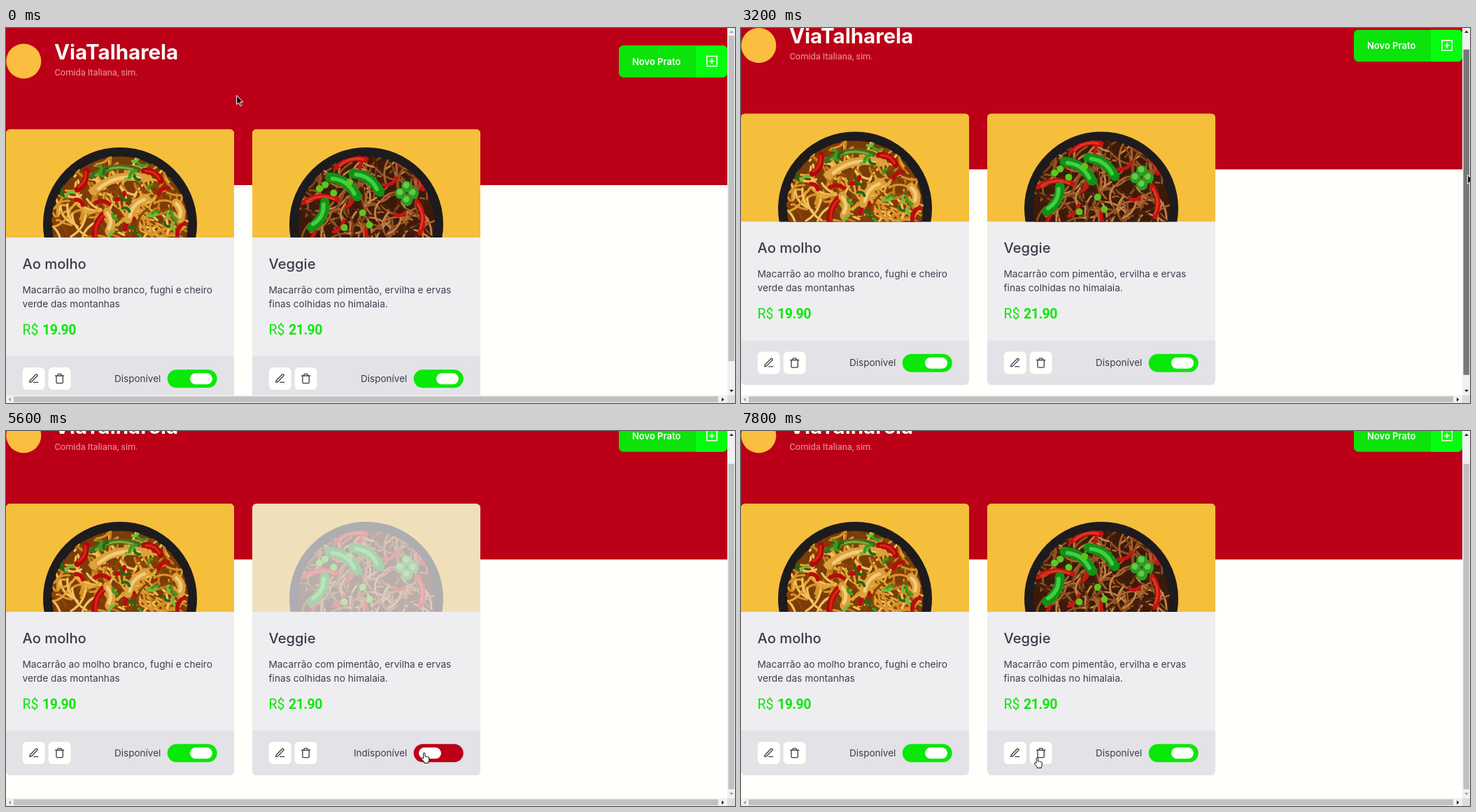
Recreate the animation shown at these times as an HTML page. Size 1042 by 537 pixels, loop 8 s.

```html
<!DOCTYPE html>
<html lang="pt">
<head>
<meta charset="utf-8">
<style>
  html, body { margin: 0; width: 100%; height: 100%; overflow: hidden; background: #fffffc; }
  svg { display: block; width: 1042px; height: 537px; font-family: Inter, "Open Sans", sans-serif; }
  .roboto { font-family: Roboto, "Liberation Sans", sans-serif; }
  .icon { fill: none; stroke: #3d3d4d; stroke-width: 2; stroke-linecap: round; stroke-linejoin: round; }
  .food path { fill: none; stroke-linecap: round; }
</style>
</head>
<body>
<svg id="stage" viewBox="0 0 1042 537"></svg>
<script>
const RED = [187, 0, 23], GREEN = [10, 232, 8], INK = '#3d3d4d', PAPER = '#fffffc';
const MAX_SCROLL = 41, THUMB_RATIO = .878;
const $ = id => document.getElementById(id);
const rgb = c => `rgb(${c.map(Math.round)})`;
const mix = (a, b, k) => a + (b - a) * k;
const ramp = (t, from, to) => Math.min(1, Math.max(0, (t - from) / (to - from)));
const repeat = (n, make) => Array.from({ length: n }, (_, i) => make(i)).join('');

let seed = 7;
const rand = (a, b) => {
  seed = (seed * 16807) % 2147483647;
  return mix(a, b, seed / 2147483647);
};
const pick = list => list[Math.floor(rand(0, list.length))];

const rect = (x, y, w, h, fill, more = '') =>
  `<rect x="${x}" y="${y}" width="${w}" height="${h}" fill="${fill}" ${more}/>`;
const text = (x, y, size, fill, str, more = '') =>
  `<text x="${x}" y="${y}" font-size="${size}" fill="${fill}" ${more}>${str}</text>`;
const dot = (x, y, r, fill) => `<circle cx="${x}" cy="${y}" r="${r}" fill="${fill}"/>`;

const PENCIL = 'M12 20h9M16.5 3.5a2.1 2.1 0 0 1 3 3L7 19l-4 1 1-4z';
const TRASH = 'M3 6h18M19 6v14a2 2 0 0 1-2 2H7a2 2 0 0 1-2-2V6m3 0V4a2 2 0 0 1 2-2h4a2 2 0 0 1 2 2v2';
const PLUS = 'M3 3h18v18H3zM12 8v8M8 12h8';
const icon = (x, y, scale, d, color = INK) =>
  `<path class="icon" transform="translate(${x} ${y}) scale(${scale})" d="${d}" style="stroke:${color}"/>`;

// A bent strip centred on x, y
const strip = (x, y, angle, half, width, color) =>
  `<path transform="translate(${x} ${y}) rotate(${angle})" d="M${-half} 3Q0 ${-half * .4} ${half} 3"
    stroke="${color}" stroke-width="${width}"/>`;
const glossy = (x, y, angle, half, width, dark, light) =>
  strip(x, y, angle, half, width, dark) + strip(x, y - 1, angle, half * .8, width * .4, light);
const scatter = (n, half, width, colors) => repeat(n, () =>
  strip(rand(-90, 90), rand(-94, 20), rand(0, 360), half * rand(.7, 1.3), width, pick(colors)));

function sauceBowl() {
  const chicken = (x, y, angle, half) => glossy(x, y, angle, half, 12, '#dca03c', '#f2cc78');
  const pepper = (x, y, angle, half) => glossy(x, y, angle, half, 9, '#b00808', '#d82418');
  return dot(0, 0, 97, '#7a3c08') +
    scatter(170, 16, 3.2, ['#e3a436', '#c47c18', '#f0c15c', '#8a4509', '#d8922a']) +
    scatter(8, 9, 6, ['#b80c0c']) +
    pepper(-52, -62, 115, 15) + pepper(-30, 0, -65, 22) + pepper(48, -72, 30, 14) +
    glossy(-8, -76, -8, 34, 8, '#456c18', '#7fa838') +
    chicken(-2, -60, -14, 38) + chicken(22, -24, -50, 20) + chicken(-14, -4, 85, 14) + chicken(86, -20, 75, 12) +
    scatter(28, 6, 4, ['#3f9a1e', '#1f6a12', '#74b83a']);
}

function veggieBowl() {
  const pod = (x, y, angle, half) => glossy(x, y, angle, half, 14, '#129018', '#40d040');
  const pepper = (x, y, angle, half) => glossy(x, y, angle, half, 7, '#c41410', '#ec3420');
  return dot(0, 0, 97, '#3c1a0a') +
    scatter(180, 17, 2.8, ['#a8622c', '#7d4218', '#c48346', '#47200c', '#8f5022']) +
    scatter(7, 10, 5, ['#c81410']) +
    pepper(-66, -36, -5, 25) + pepper(66, -72, 48, 26) + pepper(-22, -90, -15, 22) + pepper(78, -10, 85, 22) +
    pod(-31, -56, 35, 24) + pod(2, -62, 35, 23) + pod(-66, -12, 118, 20) +
    repeat(7, () => dot(rand(-75, 30), rand(-70, 18), 5, '#58c81e')) +
    repeat(4, i => {
      const x = 58 + 9 * Math.cos(i * 1.57), y = -44 + 10 * Math.sin(i * 1.57);
      return dot(x, y, 8, '#2c9c26') + dot(x - 1, y - 2, 4.5, '#62cc46');
    });
}

function card(n, x, food, title, lines, price) {
  const button = (bx, d) => rect(bx, 486, 32, 32, PAPER, 'rx="6.4"') + icon(bx + 8, 494, .667, d);
  return `<g transform="translate(${x})" clip-path="url(#card)">
    ${rect(0, 145, 326, 325, '#eeeef1')}
    <g id="photo${n}" clip-path="url(#photo)">${rect(0, 145, 326, 155, '#f5bf3c')}
      <g class="food" transform="translate(163 281)">${dot(0, 0, 110, '#1d1b1d')}<g clip-path="url(#bowl)">${food}</g></g></g>
    ${text(23.5, 345, 20.2, '#3d3b4a', title, 'font-weight="500"')}
    ${lines.map((s, i) => text(23.5, 380 + 20 * i, 13.7, INK, s)).join('')}
    ${text(23.5, 439, 19.5, rgb(GREEN), 'R$', 'class="roboto"')}
    ${text(52, 439, 19.5, rgb(GREEN), price, 'class="roboto" font-weight="700" letter-spacing="-.5"')}
    ${rect(0, 470, 326, 64, '#e2e2e7')}
    ${button(23.7, PENCIL)}${button(60.6, TRASH)}
    ${text(221.3, 507, 13.5, INK, 'Disponível', `id="label${n}" text-anchor="end"`)}
    ${rect(230.7, 489.3, 71, 26, rgb(GREEN), `id="track${n}" rx="13"`)}
    ${rect(263, 494.3, 32, 16, PAPER, `id="knob${n}" rx="8"`)}
  </g>`;
}

const clip = (id, shape) => `<clipPath id="${id}">${shape}</clipPath>`;
$('stage').innerHTML = `
  ${clip('view', rect(0, 0, 1031, 526))}
  ${clip('card', rect(0, 145, 326, 389, '', 'rx="6.4"'))}
  ${clip('photo', rect(0, 145, 326, 155))}
  ${clip('bowl', dot(0, 0, 98))}
  ${clip('cta', rect(876, 25, 155, 45.7, '', 'rx="6.4"'))}
  ${rect(0, 0, 1042, 537, PAPER)}
  <g clip-path="url(#view)"><g id="page">
    ${rect(0, 0, 1031, 225, rgb(RED))}
    ${dot(25.3, 47.5, 25, '#fbbe40')}
    ${text(69, 45, 29.5, PAPER, 'ViaTalharela', 'font-weight="700"')}
    ${text(69.5, 67.5, 12.8, '#eb9aa3', 'Comida Italiana, sim.', 'class="roboto"')}
    <g clip-path="url(#cta)">${rect(876, 25, 155, 46, '#0be30b')}${rect(986, 25, 45, 46, '#06fc0e')}</g>
    ${text(895, 52.5, 13, PAPER, 'Novo Prato', 'font-weight="600"')}
    ${icon(999.4, 38, .8, PLUS, PAPER)}
    ${card(1, 0, sauceBowl(), 'Ao molho', ['Macarrão ao molho branco, fughi e cheiro', 'verde das montanhas'], '19.90')}
    ${card(2, 352, veggieBowl(), 'Veggie', ['Macarrão com pimentão, ervilha e ervas', 'finas colhidas no himalaia.'], '21.90')}
  </g></g>
  ${rect(1031, 0, 11, 526, '#f1f1f1')}${rect(0, 526, 1031, 11, '#f1f1f1')}${rect(1031, 526, 11, 11, '#dcdcdc')}
  ${rect(11, 527.5, 1007, 8.5, '#c1c1c1')}
  ${rect(1032.5, 11, 8.5, 466, '#c1c1c1', 'id="thumb"')}
  <path id="up" d="M1034 7h6l-3-3.5z"/><path id="down" d="M1034 518h6l-3 3.5z"/>
  <path d="M7 529v6l-3.5-3z" fill="#a3a3a3"/><path d="M1023 529v6l3.5-3z" fill="#303030"/>
  <g id="cursor" stroke-linejoin="round">
    <path id="arrow" d="M.6 .6V13.6L3.6 10.8L5.8 15.6L7.9 14.7L5.8 10H9.8z" fill="#111" stroke="#fff"/>
    <path id="hand" d="M3.6 9V2a1.2 1.2 0 0 1 2.4 0v4.2q1-.8 2 .2q1-.6 1.8 .4q1.8-.3 1.9 1.2v3q0 2-1 3v1.5H4.8v-1.3L1 9.7q-.6-1.4 .7-1.7q1 0 1.9 1z" fill="#fff" stroke="#111"/>
  </g>`;

// Pointer moves: start and end time, then where it comes to rest
const HOME = [329, 96];
const MOVES = [
  [600, 700, 640, 74], [700, 800, 920, 160], [1000, 1300, 1030, 200], [2000, 2400, 1024, 212],
  [2500, 2800, 1038, 190], [3900, 4000, 712, 340], [4200, 4800, 593, 460], [6200, 6400, 602, 478],
  [6400, 6800, 630, 464], [6900, 7100, 511, 476], [7400, 7600, 471, 469], [7700, 7800, 418.5, 467]
];
const pointerAt = t => MOVES.reduce(([x, y], [from, to, nx, ny]) => {
  const k = ramp(t, from, to);
  return [mix(x, nx, k), mix(y, ny, k)];
}, HOME);

const inside = (x, y, l, t, r, b) => x >= l && x <= r && y >= t && y <= b;

function draw(now) {
  const t = Math.floor(now % 8000 / 100) * 100;
  const scroll = MAX_SCROLL * (1 - (1 - ramp(t, 3000, 3700)) ** 2.37);
  const on = 1 - ramp(t, 5100, 5600) + ramp(t, 5880, 6500);
  const fade = 1 - .7 * (ramp(t, 5100, 5500) - ramp(t, 5880, 6420));
  const dragging = t > 3000 && t < 4000;
  let [x, y] = pointerAt(t);
  if (dragging) y += scroll * THUMB_RATIO;

  $('page').setAttribute('transform', `translate(0 ${-scroll})`);
  $('thumb').setAttribute('y', 11 + scroll * THUMB_RATIO);
  $('thumb').setAttribute('fill', dragging ? '#787878' : x >= 1028 ? '#a8a8a8' : '#c1c1c1');
  $('up').setAttribute('fill', scroll > 0 ? '#303030' : '#a3a3a3');
  $('down').setAttribute('fill', scroll < MAX_SCROLL ? '#303030' : '#a3a3a3');

  $('photo2').setAttribute('opacity', fade);
  $('label2').textContent = t > 5100 && t < 5900 ? 'Indisponível' : 'Disponível';
  $('track2').setAttribute('fill', rgb(RED.map((v, i) => mix(v, GREEN[i], on))));
  $('knob2').setAttribute('x', mix(238, 263, on));

  const hand = inside(x, y, 583, 448, 654, 474) || inside(x, y, 413, 445, 445, 477);
  $('cursor').setAttribute('transform', `translate(${x} ${y})`);
  $('arrow').style.display = hand ? 'none' : '';
  $('hand').style.display = hand ? '' : 'none';
}

const start = performance.now();
function tick() {
  draw(performance.now() - start);
  requestAnimationFrame(tick);
}
tick();
</script>
</body>
</html>
```
